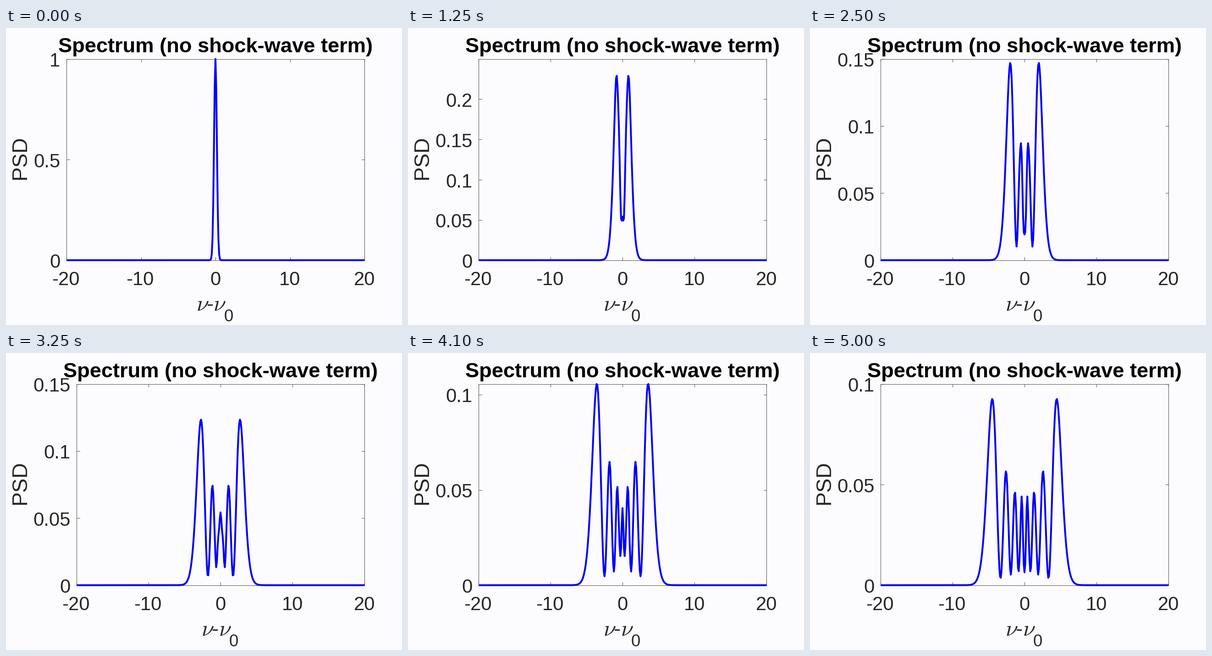
These frames come from a looping animation (864 by 648 pixels, 5050 ms). A matplotlib script:

```python
import numpy as np
import matplotlib
import matplotlib.pyplot as plt
from matplotlib.animation import FuncAnimation

matplotlib.rcParams["mathtext.fontset"] = "cm"

W, H = 864, 648
FRAMES, INTERVAL = 101, 50
PHASE_MAX = 7.55 * np.pi
BG, INK = "#fcfcfe", "#262626"
RIGHT, TOP, BOTTOM = 782, 67.6, 506.6
TICK = 6.5
SANS = "Liberation Sans"

# (peak above, axis top, tick step); None fits the axis to the peak
SCALES = [(.8, 1, .5), (.6, .8, .2), (.48, .6, .2), (.4, .5, .1),
          (.3, .4, .1), (.24, .3, .1), (.2, .25, .05), (.15, .2, .05),
          (.12, .15, .05), (.1, None, .05), (0, .1, .05)]

# Gaussian pulse of unit FWHM and its Fourier kernel (even in time)
t = np.linspace(-5, 5, 2001)
pulse = np.exp(-2 * np.log(2) * t ** 2)
nu = np.linspace(-20, 20, 401)
kernel = np.cos(2 * np.pi * np.outer(nu, t)) / pulse.sum()


def spectrum(n):
    phase = PHASE_MAX * n / (FRAMES - 1)
    field = pulse * np.exp(1j * phase * pulse ** 2)
    return np.abs(kernel @ field) ** 2


def y_scale(peak):
    for above, top, step in SCALES:
        if peak > above:
            top = top or peak
            break
    ticks = step * np.arange(int(top / step + 1e-6) + 1)
    return top, step, ticks[:5]


fig = plt.figure(figsize=(W / 72, H / 72), dpi=72, facecolor=BG)
ax = fig.add_axes([0, 0, 1, 1])
ax.set_xlim(0, W)
ax.set_ylim(H, 0)
ax.axis("off")


def label(x, y, s, size, **kw):
    opts = dict(family=SANS, color=INK, ha="center", va="baseline")
    opts.update(kw)
    return ax.text(x, y, s, fontsize=size, **opts)


frame, = ax.plot([], [], color=INK, lw=0.8, zorder=1)
marks, = ax.plot([], [], color=INK, lw=0.8, zorder=1)
curve, = ax.plot([], [], color="#0000ff", lw=4, zorder=3, clip_on=False,
                 solid_capstyle="butt", solid_joinstyle="round")

label(43, 283, "PSD", 46.5, rotation=90, rotation_mode="anchor")
title = label(0, 53, "Spectrum (no shock-wave term)", 45.3,
              color="black", weight="bold", zorder=4)
x_labels = [label(0, 561, str(v), 41.7) for v in range(-20, 21, 10)]
y_labels = [label(0, 0, "", 41.7, ha="right") for _ in range(5)]
axis_name = [(label(0, 617, r"$\nu$", 49, ha="left"), -42),
             (label(0, 617, "-", 45.8, ha="left"), -19),
             (label(0, 617, r"$\nu$", 49, ha="left"), -4.5),
             (label(0, 640, "0", 36.7, ha="left"), 19)]


def update(n):
    power = spectrum(n)
    top, step, ticks = y_scale(power.max())
    left = 154 if step < .1 else 132
    mid = (left + RIGHT) / 2

    def px(v):
        return mid + v * (RIGHT - left) / 40

    def py(v):
        return BOTTOM - v * (BOTTOM - TOP) / top

    frame.set_data([left, RIGHT, RIGHT, left, left],
                   [TOP, TOP, BOTTOM, BOTTOM, TOP])
    curve.set_data(px(nu), py(power))

    segs = []
    for text, v in zip(x_labels, range(-20, 21, 10)):
        x = px(v)
        text.set_x(x - (2 if v < 0 else 0))
        segs += [(x, BOTTOM), (x, BOTTOM - TICK), (np.nan, np.nan),
                 (x, TOP), (x, TOP + TICK), (np.nan, np.nan)]
    for i, text in enumerate(y_labels):
        text.set_text("")
        if i < len(ticks):
            y = py(ticks[i])
            text.set_text(f"{ticks[i]:g}")
            text.set_position((left - 13.5, y + 16.5))
            segs += [(left, y), (left + TICK, y), (np.nan, np.nan),
                     (RIGHT, y), (RIGHT - TICK, y), (np.nan, np.nan)]
    marks.set_data(*np.array(segs).T)

    title.set_x(mid)
    for text, dx in axis_name:
        text.set_x(mid + dx)
    return []


anim = FuncAnimation(fig, update, frames=FRAMES, interval=INTERVAL,
                     repeat=True, repeat_delay=0, init_func=lambda: update(0))
plt.show()
```
